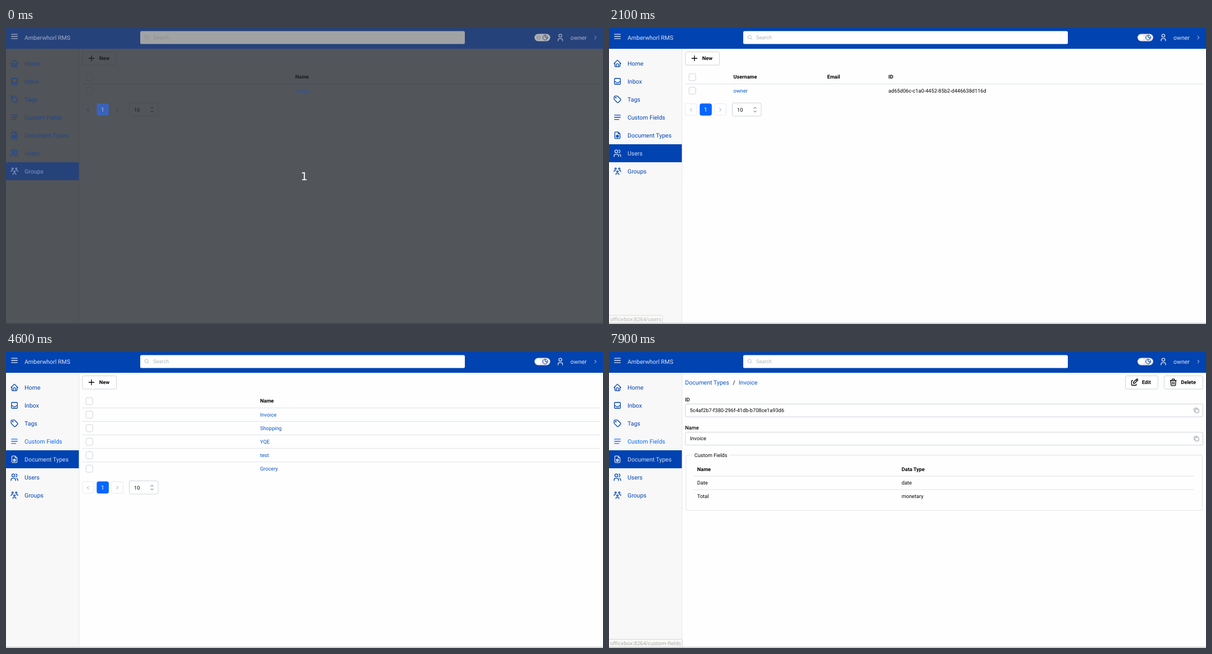
An HTML page for the animation above (8000 ms loop, 1063 by 527 pixels).

```html
<!DOCTYPE html>
<html lang="en">
<head>
<meta charset="utf-8">
<title>Document manager</title>
<style>
  html, body { margin: 0; width: 100%; height: 100%; overflow: hidden; }
  svg {
    display: block; width: 1063px; height: 527px;
    font-family: Roboto, sans-serif; text-rendering: geometricPrecision;
    --page: #fefefe; --side: #f8f8f8; --edge: #e3e5e8; --line: #dee2e6; --box: #fff;
    --border: #ced4da; --faint: #e6e9ec; --bar: #0043b1; --nav: #0043b1; --hover: #0d68f2;
    --on: #d3dff3; --title: #dbe5f5; --text: #050505; --link: #0753c6; --field: #fff;
    --hint: #adb5bd; --pill: #e9ecef; --accent: #0566ff; --white: #fff; --grey: #868e96; --foot: #b8b8b8;
  }
  svg.dim {
    --page: #525559; --side: #515458; --edge: #4c4f53; --line: #4a4d51; --box: #525559;
    --border: #4b4e52; --faint: #515458; --bar: #26427b; --nav: #20468f;
    --on: #8297c0; --title: #a3b0c9; --text: #1d1f21; --link: #2b55a0; --field: #a0a2a4;
    --hint: #8b8e91; --pill: #b3b5b7; --accent: #3a62b8; --white: #b4c1dc; --grey: #33373b; --foot: #414448;
  }
</style>
</head>
<body>
<svg id="stage" viewBox="0 0 1063 527"></svg>
<script>
const stage = document.getElementById('stage');
const LOOP = 8000, SMALL = 9.19, NORMAL = 10.5;
const HOST = 'officebox:8264/';
const INVOICE_ID = '5c4af2b7-f380-296f-41db-b708ce1a93d6';

const ICONS = {
  home: 'M5 12H3l9-9 9 9h-2M5 12v7a2 2 0 0 0 2 2h10a2 2 0 0 0 2-2v-7M9 21v-6a2 2 0 0 1 2-2h2a2 2 0 0 1 2 2v6',
  inbox: 'M4 6a2 2 0 0 1 2-2h12a2 2 0 0 1 2 2v12a2 2 0 0 1-2 2H6a2 2 0 0 1-2-2zM4 13h3l3 3h4l3-3h3',
  tag: 'M7.5 6.5a1 1 0 1 0 0 2 1 1 0 0 0 0-2M3 6v5.2a2 2 0 0 0 .6 1.4l7.7 7.7a2.4 2.4 0 0 0 3.4 0l5.6-5.6a2.4 2.4 0 0 0 0-3.4l-7.7-7.7A2 2 0 0 0 11.2 3H6a3 3 0 0 0-3 3z',
  lines: 'M4 6h16M4 12h16M4 18h12',
  file: 'M14 3v4a1 1 0 0 0 1 1h4M17 21H7a2 2 0 0 1-2-2V5a2 2 0 0 1 2-2h7l5 5v11a2 2 0 0 1-2 2zM9 13l3-1.5 3 1.5v3.5l-3 1.5-3-1.5zl3 1.5 3-1.5M12 14.5V18',
  users: 'M9 3a4 4 0 1 0 0 8 4 4 0 0 0 0-8M3 21v-2a4 4 0 0 1 4-4h4a4 4 0 0 1 4 4v2M16 3.13a4 4 0 0 1 0 7.75M21 21v-2a4 4 0 0 0-3-3.85',
  group: 'M10 13a2 2 0 1 0 4 0 2 2 0 0 0-4 0M8 21v-1a2 2 0 0 1 2-2h4a2 2 0 0 1 2 2v1M15 5a2 2 0 1 0 4 0 2 2 0 0 0-4 0M17 10h2a2 2 0 0 1 2 2v1M5 5a2 2 0 1 0 4 0 2 2 0 0 0-4 0M3 13v-1a2 2 0 0 1 2-2h2',
  menu: 'M4 6h16M4 12h16M4 18h16',
  user: 'M8 7a4 4 0 1 0 8 0 4 4 0 0 0-8 0M6 21v-2a4 4 0 0 1 4-4h4a4 4 0 0 1 4 4v2',
  search: 'M3 10a7 7 0 1 0 14 0 7 7 0 0 0-14 0M21 21l-6-6',
  moon: 'M3 12a9 9 0 1 0 18 0 9 9 0 0 0-18 0M12 3v6a4 4 0 0 0 4 4h5M12 9l5 6',
  plus: 'M12 5v14M5 12h14',
  left: 'M15 6l-6 6 6 6',
  right: 'M9 6l6 6-6 6',
  selector: 'M8 8l4-4 4 4M16 16l-4 4-4-4',
  edit: 'M7 7H6a2 2 0 0 0-2 2v9a2 2 0 0 0 2 2h9a2 2 0 0 0 2-2v-1M20.4 6.6a2.1 2.1 0 0 0-3-3L9 12v3h3zM16 5l3 3',
  trash: 'M4 7h16M10 11v6M14 11v6M5 7l1 12a2 2 0 0 0 2 2h8a2 2 0 0 0 2-2l1-12M9 7V4a1 1 0 0 1 1-1h4a1 1 0 0 1 1 1v3',
  copy: 'M7 9.7A2.7 2.7 0 0 1 9.7 7h8.6A2.7 2.7 0 0 1 21 9.7v8.6a2.7 2.7 0 0 1-2.7 2.7H9.7A2.7 2.7 0 0 1 7 18.3zM4 16.7A2 2 0 0 1 3 15V5c0-1.1.9-2 2-2h10c.75 0 1.2.4 1.5 1'
};

const NAV = [
  ['Home', 'home'], ['Inbox', 'inbox'], ['Tags', 'tag'], ['Custom Fields', 'lines'],
  ['Document Types', 'file'], ['Users', 'users'], ['Groups', 'group']
];

// Columns are [x, heading, cells, isLink].
const TABLES = {
  groups: [[515, 'Name', ['owner'], true]],
  users: [
    [221.5, 'Username', ['owner'], true],
    [388.5, 'Email', [''], false],
    [497.5, 'ID', ['ad65d06c-c1a0-4452-85b2-d446638d116d'], false]
  ],
  types: [[452.5, 'Name', ['Invoice', 'Shopping', 'YQE', 'test', 'Grocery'], true]]
};

// Each entry changes only the properties it names.
const TIMELINE = [
  [0, { page: 'groups', active: 'Groups', hover: '', status: '', fade: 1, dim: true }],
  [100, { dim: false }],
  [900, { hover: 'Users' }],
  [1600, { status: 'users' }],
  [1800, { page: 'users', active: 'Users', hover: '' }],
  [2000, { fade: .7 }],
  [2100, { fade: .35 }],
  [2200, { status: '', fade: 1 }],
  [2500, { hover: 'Document Types' }],
  [3100, { status: 'document-types' }],
  [3300, { page: 'types', active: 'Document Types', hover: '' }],
  [3400, { status: '' }],
  [4600, { hover: 'Custom Fields' }],
  [5200, { status: 'custom-fields', fade: .5 }],
  [5300, { fade: 1 }],
  [5400, { hover: '' }],
  [5600, { hover: 'Invoice' }],
  [5700, { status: 'document-types/' + INVOICE_ID }],
  [6400, { page: 'detail', hover: '' }],
  [6500, { fade: .4 }],
  [6600, { status: '', fade: 1 }],
  [7600, { hover: 'Custom Fields' }],
  [7900, { status: 'custom-fields', fade: .42 }]
];

const color = name => `var(--${name})`;

function text(x, middle, label, { size = SMALL, fill = 'text', weight = 400, anchor = 'start' } = {}) {
  return `<text x="${x}" y="${middle + size * .356}" font-size="${size}" font-weight="${weight}"
    text-anchor="${anchor}" fill="${color(fill)}">${label}</text>`;
}

function box(x, y, w, h, fill, border, radius = 0) {
  const stroke = border ? `stroke="${color(border)}"` : '';
  return `<rect x="${x}" y="${y}" width="${w}" height="${h}" rx="${radius}" fill="${color(fill)}" ${stroke}/>`;
}

function icon(name, x, y, fill, scale = .656, width = 2) {
  return `<path d="${ICONS[name]}" transform="translate(${x} ${y}) scale(${scale}) translate(-12 -12)"
    fill="none" stroke="${color(fill)}" stroke-width="${width}" stroke-linecap="round" stroke-linejoin="round"/>`;
}

const rule = (x1, x2, y) => box(x1, y - .5, x2 - x1, 1, 'line');

function button(x, width, name, label, labelX) {
  return box(x, 42.5, width, 23.5, 'box', 'border', 2.6) + icon(name, x + 16.2, 54, 'text') +
    text(labelX, 54, label, { weight: 700 });
}

function header() {
  return box(0, 0, 1063, 37, 'bar') + icon('menu', 15, 15, 'title') +
    text(33, 17, 'Amberwhorl RMS', { size: NORMAL, fill: 'title' }) +
    box(239, 5.5, 578, 23, 'field', '', 2.6) + icon('search', 251, 17, 'hint', .44) +
    text(262, 17, 'Search', { fill: 'hint' }) +
    box(941, 10.5, 28, 13, 'pill', '', 6.5) +
    `<circle cx="948" cy="17" r="4.6" fill="${color('field')}"/>` +
    icon('moon', 960, 17, 'bar', .48) + icon('user', 987, 17, 'title') +
    text(1005, 17, 'owner', { size: NORMAL, fill: 'title' }) + icon('right', 1049.5, 17, 'title', .46);
}

function sidebar({ active, hover }) {
  return box(0, 37, 130, 490, 'side') + box(129.5, 37, 1, 488, 'edge') +
    NAV.map(([label, name], i) => {
      const y = 63 + 32 * i;
      const fill = label === active ? 'on' : label === hover ? 'hover' : 'nav';
      return (label === active ? box(0, y - 16, 129.7, 32, 'bar') : '') +
        icon(name, 15, y, fill) + text(33, y, label, { size: NORMAL, fill });
    }).join('');
}

function pagination(y) {
  const pageButton = (x, fill, border) => box(x, y - 10.5, 20.5, 20.5, fill, border, 2.6);
  return pageButton(136, 'box', 'faint') + icon('left', 146, y + .2, 'grey', .44) +
    pageButton(162, 'accent', 'accent') + text(172, y, '1', { size: NORMAL, fill: 'white', anchor: 'middle' }) +
    pageButton(188, 'box', 'faint') + icon('right', 198.3, y + .2, 'grey', .44) +
    box(219.5, y - 12, 51.5, 23.5, 'box', 'border', 2.6) + text(228, y, '10') +
    icon('selector', 260, y, 'grey', .54);
}

function listPage(columns, hover) {
  const rows = columns[0][2].length;
  const rowY = i => 87.3 + 24.05 * i;
  let out = button(136, 60.5, 'plus', 'New', 166);
  for (let i = 0; i <= rows; i++) {
    out += box(142.5, rowY(i) - 6, 12, 12.5, 'box', 'border', 2.6);
    if (i < rows) out += rule(135.5, 1058, rowY(i) + 12.3);
  }
  for (const [x, heading, cells, isLink] of columns) {
    out += text(x, rowY(0) - .3, heading, { weight: 700 });
    cells.forEach((cell, i) => {
      const fill = cell === hover ? 'hover' : isLink ? 'link' : 'text';
      out += text(x, rowY(i + 1) - .1, cell, { fill });
    });
  }
  return out + pagination(145.4 + 24 * (rows - 1));
}

function copyField(label, value, y) {
  return text(135.5, y - 19.7, label, { weight: 500 }) +
    box(136, y - 11.5, 921.5, 23, 'box', 'border', 2.6) +
    text(144, y - .3, value) + icon('copy', 1046, y, 'grey', .46);
}

function detailPage() {
  const crumb = { size: NORMAL, fill: 'link' };
  const row = (y, name, type, weight) => text(157, y, name, { weight }) + text(521, y, type, { weight });
  return text(135.5, 54, 'Document Types', crumb) + text(220.5, 54, '/', { size: NORMAL }) +
    text(231, 54, 'Invoice', crumb) +
    button(919.5, 58, 'edit', 'Edit', 949) + button(988.5, 69, 'trash', 'Delete', 1018.5) +
    copyField('ID', INVOICE_ID, 104) + copyField('Name', 'Invoice', 154.3) +
    box(137, 183.5, 919.5, 98.5, 'page', 'line', 2.6) + box(148, 181, 66, 5, 'page') +
    text(152, 183.3, 'Custom Fields') +
    row(209, 'Name', 'Data Type', 700) + rule(150, 1042, 221) +
    row(232.5, 'Date', 'date', 400) + rule(150, 1042, 245) + row(256.7, 'Total', 'monetary', 400);
}

function statusBubble({ status, fade }) {
  if (!status) return '';
  return `<g opacity="${fade}">
    <path id="bubble" fill="#f9f8f6" stroke="#b4b3b1"/>
    <text id="address" x="2" y="522" font-size="9.3" font-family="Noto Sans, sans-serif"
      fill="#3a3a3a">${HOST + status}</text></g>`;
}

function countdown() {
  return `<text x="531" y="271" text-anchor="middle" font-size="19.5"
    font-family="DejaVu Sans, sans-serif" fill="#fff">1</text>`;
}

function draw(state) {
  stage.classList.toggle('dim', state.dim);
  stage.innerHTML = box(0, 0, 1063, 527, 'page') + sidebar(state) + header() +
    (state.page === 'detail' ? detailPage() : listPage(TABLES[state.page], state.hover)) +
    box(0, 525, 1063, 1.3, 'foot') + statusBubble(state) + (state.dim ? countdown() : '');
  const address = document.getElementById('address');
  if (address) {
    const right = Math.round(address.getComputedTextLength() + 4) + .5;
    document.getElementById('bubble').setAttribute('d', `M-1 511.5H${right - 2}q2 0 2 2V525.5H-1z`);
  }
}

let shown = -1;
function tick(now) {
  const time = now % LOOP;
  const step = TIMELINE.filter(([start]) => start <= time).length;
  if (step !== shown) {
    shown = step;
    draw(Object.assign({}, ...TIMELINE.slice(0, step).map(([, change]) => change)));
  }
  requestAnimationFrame(tick);
}
tick(0);
</script>
</body>
</html>
```
